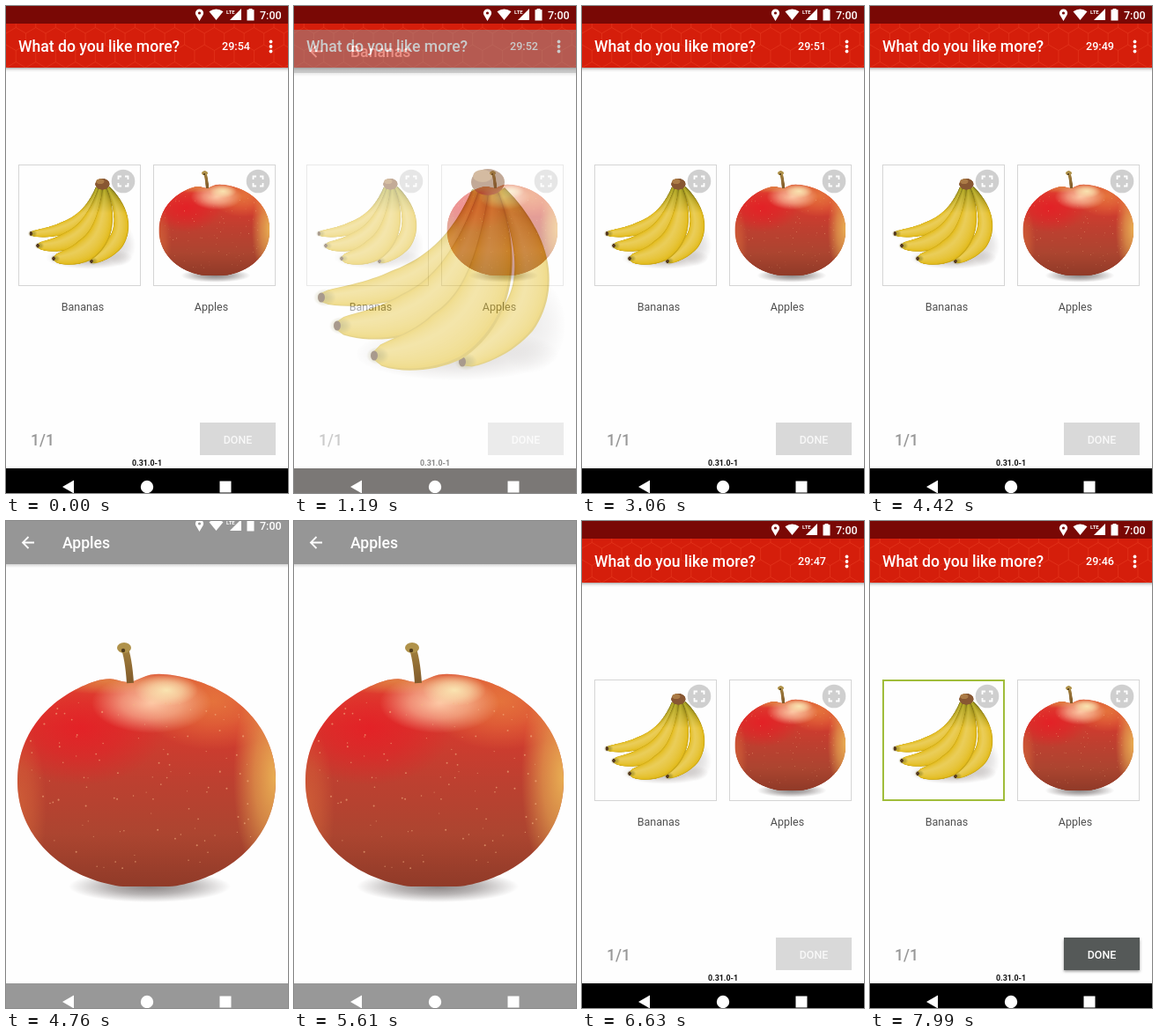
An HTML page with a canvas that plays this animation: 320x553 px, repeating every 8160 ms.

```html
<!DOCTYPE html>
<html lang="en">
<head>
<meta charset="utf-8">
<title>Fruit poll</title>
<style>
html, body { margin: 0; width: 100%; height: 100%; overflow: hidden; background: #fefefe; }
canvas { display: block; width: 320px; height: 553px; }
</style>
</head>
<body>
<canvas id="stage" width="320" height="553"></canvas>
<script>
const W = 320, H = 553, LOOP = 8160, STEP = 170;
const FADE = 170, SELECT_AT = 6800;
const VISITS = [
  { fruit: 'Bananas', open: 1105, close: 2620 },
  { fruit: 'Apples', open: 4505, close: 5850 }
];
const stage = document.getElementById('stage').getContext('2d');
const clamp = v => Math.max(0, Math.min(1, v));

function layer(paint) {
  const c = document.createElement('canvas');
  c.width = W;
  c.height = H;
  paint(c.getContext('2d'));
  return c;
}

function rect(g, x, y, w, h, color) {
  g.fillStyle = color;
  g.fillRect(x, y, w, h);
}

function oval(g, x, y, rx, ry, color) {
  g.fillStyle = color;
  g.beginPath();
  g.ellipse(x, y, rx, ry, 0, 0, Math.PI * 2);
  g.fill();
}

const dot = (g, x, y, r, color) => oval(g, x, y, r, r, color);

function triangle(g, ax, ay, bx, by, cx, cy) {
  g.beginPath();
  g.moveTo(ax, ay);
  g.lineTo(bx, by);
  g.lineTo(cx, cy);
  g.fill();
}

function text(g, s, x, y, size, weight, color, align = 'left') {
  g.font = `${weight} ${size}px Roboto, sans-serif`;
  g.textAlign = align;
  g.fillStyle = color;
  g.fillText(s, x, y);
}

function vertical(g, y0, y1, ...colors) {
  const grad = g.createLinearGradient(0, y0, 0, y1);
  colors.forEach((c, i) => grad.addColorStop(i / (colors.length - 1), c));
  return grad;
}

// Soft elliptical spot; rgb is "r,g,b"
function glow(g, x, y, rx, ry, rgb, a) {
  g.save();
  g.translate(x, y);
  g.scale(rx, ry);
  const grad = g.createRadialGradient(0, 0, 0, 0, 0, 1);
  grad.addColorStop(0, `rgba(${rgb},${a})`);
  grad.addColorStop(0.5, `rgba(${rgb},${a * 0.6})`);
  grad.addColorStop(1, `rgba(${rgb},0)`);
  dot(g, 0, 0, 1, grad);
  g.restore();
}

// Swollen tube along a quadratic spine; nested layers brighten toward the lit side
function banana(g, tipX, tipY, bendX, bendY, neckX, girth) {
  const neckY = 182, LAYERS = 12, N = 40;
  const edge = (u, side, shift) => {
    const v = 1 - u;
    const x = v * v * tipX + 2 * u * v * bendX + u * u * neckX;
    const y = v * v * tipY + 2 * u * v * bendY + u * u * neckY;
    const dx = v * (bendX - tipX) + u * (neckX - bendX);
    const dy = v * (bendY - tipY) + u * (neckY - bendY);
    const half = 5 + (girth - 5) * Math.sqrt(clamp(u * 3)) * (1 - u ** 4);
    const k = half * (side + shift) / Math.hypot(dx, dy);
    return [x + dy * k, y - dx * k];
  };
  for (let i = 0; i < LAYERS; i++) {
    const d = i / LAYERS;
    g.beginPath();
    for (let n = 0; n <= N; n++) g.lineTo(...edge(n / N, 1 - d, d * 0.3));
    for (let n = N; n >= 0; n--) g.lineTo(...edge(n / N, d - 1, d * 0.3));
    const light = 45 + 19 * Math.sqrt(d);
    g.fillStyle = vertical(g, 185, 250, `hsl(56,65%,${light - 20}%)`, `hsl(48,78%,${light}%)`);
    g.fill();
  }
  glow(g, tipX + 4, tipY, 13, 10, '125,115,25', 0.6);
  oval(g, tipX, tipY, 4, 5.5, '#55391f');
}

function paintBananas(g) {
  glow(g, 185, 368, 115, 30, '80,65,60', 0.38);
  glow(g, 268, 335, 40, 55, '80,70,70', 0.2);
  banana(g, 31, 304, 182, 301, 207, 17);
  banana(g, 49, 336, 195, 342, 215, 24);
  banana(g, 191, 377, 322, 316, 235, 22);
  banana(g, 91, 370, 246, 366, 226, 31);
  oval(g, 220, 173, 19, 15, '#885732');
  oval(g, 214, 166, 11, 7, '#ab7b46');
}

function paintApple(g) {
  const cx = 159.5, cy = 295, rx = 146.5, ry = 122, power = 2 / 2.08;
  const round = v => Math.sign(v) * Math.abs(v) ** power;
  glow(g, 163, 415, 92, 18, '60,50,50', 0.6);
  g.save();
  // Rounded body with a dip under the stem and a flat base
  g.beginPath();
  for (let a = 0; a < Math.PI * 2; a += 0.03) {
    const x = cx + rx * round(Math.cos(a));
    const y = cy + ry * round(Math.sin(a));
    const dip = y < cy ? 9 * Math.exp(-(((x - 140) / 18) ** 2)) : 0;
    g.lineTo(x, Math.min(y + dip, 415));
  }
  g.clip();
  rect(g, 0, 0, W, H, vertical(g, 173, 417, '#dc5638', '#d43a2e', '#bd4030', '#ac4530', '#8f3a28'));
  glow(g, 85, 235, 95, 65, '232,26,36', 0.75);
  glow(g, 235, 205, 85, 55, '232,125,62', 0.8);
  glow(g, 306, 290, 48, 130, '235,180,85', 0.95);
  glow(g, 14, 325, 32, 95, '220,110,60', 0.6);
  glow(g, 115, 182, 75, 15, '226,140,70', 0.75);
  glow(g, 165, 207, 68, 34, '255,205,170', 0.95);
  glow(g, 182, 192, 36, 18, '250,232,180', 0.95);
  let seed = 17;
  const rnd = () => (seed = seed * 16807 % 2147483647) / 2147483647;
  for (let i = 0; i < 110; i++) {
    dot(g, 28 + rnd() * 250, 205 + rnd() * 190, 0.5 + rnd() * 0.6, 'rgba(245,180,130,0.6)');
  }
  g.restore();
  g.lineWidth = 8;
  g.strokeStyle = vertical(g, 140, 185, '#a58440', '#80592a');
  g.beginPath();
  g.moveTo(134, 143);
  g.quadraticCurveTo(139, 155, 141, 184);
  g.stroke();
  oval(g, 134, 144, 8, 6, '#b0924a');
  dot(g, 133, 147, 2.2, '#513c1c');
}

const fruits = { Bananas: layer(paintBananas), Apples: layer(paintApple) };

function paintStatus(g) {
  // Location pin with a hole
  g.fillStyle = '#fff';
  g.beginPath();
  g.arc(219.5, 8, 4.6, Math.PI * 0.88, Math.PI * 0.12);
  g.lineTo(219.5, 17);
  g.closePath();
  g.moveTo(221.1, 8);
  g.arc(219.5, 8, 1.6, 0, Math.PI * 2);
  g.fill('evenodd');
  // Wifi fan
  g.beginPath();
  g.moveTo(238.5, 16);
  g.lineTo(230.5, 6.3);
  g.quadraticCurveTo(238.5, 0.8, 246.5, 6.3);
  g.fill();
  triangle(g, 267, 3, 267, 16, 254, 16);
  rect(g, 273.5, 4.2, 8, 12.3, '#fff');
  rect(g, 275.5, 3, 4, 2, '#fff');
  text(g, 'LTE', 250, 8.5, 6, 700, '#fff');
  text(g, '7:00', 288, 14.5, 12.5, 500, '#fff');
}

function paintNav(g, color) {
  rect(g, 0, 525, W, 28, color);
  g.fillStyle = '#fff';
  triangle(g, 64, 546, 77, 538.5, 77, 553.5);
  dot(g, 160, 546, 7.2, '#fff');
  rect(g, 242.5, 539.5, 13, 13, '#fff');
}

function paintHeader(g) {
  g.save();
  g.beginPath();
  g.rect(0, 20, W, 50);
  g.clip();
  rect(g, 0, 20, W, 50, '#d51e0b');
  g.strokeStyle = 'rgba(240,75,45,0.4)';
  g.lineWidth = 1;
  const r = 13, dx = r * Math.sqrt(3);
  for (let row = 0; row < 4; row++) {
    for (let x = row % 2 * dx / 2; x < W + dx; x += dx) {
      g.beginPath();
      for (let k = 0; k < 4; k++) {
        const a = Math.PI * (k / 3 - 0.5);
        g.lineTo(x + r * Math.cos(a), 18 + row * r * 1.5 + r * Math.sin(a));
      }
      g.stroke();
    }
  }
  g.restore();
  rect(g, 0, 70, W, 5, vertical(g, 70, 75, 'rgba(0,0,0,0.3)', 'rgba(0,0,0,0.08)', 'rgba(0,0,0,0)'));
}

function paintCard(g, name, x, labelX, picked) {
  g.save();
  g.translate(x + 1, 128);
  g.scale(0.429, 0.429);
  g.drawImage(fruits[name], 0, 0);
  g.restore();
  const line = picked ? 2 : 1;
  g.lineWidth = line;
  g.strokeStyle = picked ? '#a0bd3a' : '#d5d5d5';
  g.strokeRect(x + line / 2, 180 + line / 2, 139 - line, 138 - line);

  const cx = x + 119, cy = 199;
  dot(g, cx, cy, 13.3, 'rgba(200,200,200,0.88)');
  g.strokeStyle = '#fff';
  g.lineWidth = 1.8;
  for (const sx of [-1, 1]) for (const sy of [-1, 1]) {
    g.beginPath();
    g.moveTo(cx + sx * 2, cy + sy * 5.5);
    g.lineTo(cx + sx * 5.5, cy + sy * 5.5);
    g.lineTo(cx + sx * 5.5, cy + sy * 2);
    g.stroke();
  }
  text(g, name, labelX, 346, 12.5, 400, '#505050', 'center');
}

function paintMain(g, t) {
  rect(g, 0, 0, W, H, '#fefefe');
  rect(g, 0, 0, W, 20, '#790805');
  paintHeader(g);
  text(g, 'What do you like more?', 14, 52, 17.6, 500, '#fff');
  const sec = 54 - Math.floor(t / 1000 + 0.9);
  text(g, '29:' + sec, 245, 50, 12.6, 500, '#fff');
  for (const dy of [-5.5, 0, 5.5]) dot(g, 300.5, 46 + dy, 1.9, '#fff');

  const picked = t >= SELECT_AT;
  paintCard(g, 'Bananas', 14, 87, picked);
  paintCard(g, 'Apples', 167, 233, false);

  text(g, '1/1', 28, 498.5, 17.6, 500, '#989898');
  g.save();
  if (picked) {
    g.shadowColor = 'rgba(0,0,0,0.4)';
    g.shadowBlur = 3;
    g.shadowOffsetY = 1.5;
  }
  rect(g, 220, 473, 86, 37, picked ? '#555958' : '#d9d9d9');
  g.restore();
  text(g, 'DONE', 263, 496.5, 12.4, 500, picked ? '#fff' : '#f8f8f8', 'center');
  text(g, '0.31.0-1', 160, 522, 8.9, 700, '#111', 'center');
}

function paintDetail(g, name) {
  rect(g, 0, 0, W, H, '#fefefe');
  g.drawImage(fruits[name], 0, 0);
  rect(g, 0, 0, W, 49, '#969696');
  rect(g, 0, 49, W, 4, vertical(g, 49, 53, 'rgba(0,0,0,0.16)', 'rgba(0,0,0,0)'));
  text(g, name, 64, 31, 17.6, 500, '#fff');
  g.strokeStyle = '#fff';
  g.lineWidth = 1.8;
  g.beginPath();
  g.moveTo(32, 24.5);
  g.lineTo(19, 24.5);
  g.moveTo(25.5, 18);
  g.lineTo(19, 24.5);
  g.lineTo(25.5, 31);
  g.stroke();
}

const details = {};

function buildDetails() {
  for (const { fruit } of VISITS) details[fruit] = layer(g => paintDetail(g, fruit));
}

// Draws the open picture page and returns how far the status icons have moved
function drawVisit(g, t, { fruit, open, close }) {
  const enter = clamp((t - open) / FADE);
  const leave = clamp((t - close) / FADE);
  const full = enter === 1 && leave === 0;
  const y = full ? 0 : enter < 1 ? 20 + 14 * (1 - enter) : 22 * leave;
  rect(g, 0, 20, W, H, `rgba(0,0,0,${0.1 * leave})`);
  g.globalAlpha = enter * (1 - leave);
  g.drawImage(details[fruit], 0, y);
  g.globalAlpha = 1;
  paintNav(g, full ? '#989898' : '#7b7876');
  if (full) return -20 * clamp((t - open - FADE) / FADE) ** 2;
  return enter < 1 ? 0 : -4 * (1 - leave);
}

function draw(t) {
  const g = stage;
  const visit = VISITS.find(v => t >= v.open && t < v.close + FADE);
  paintMain(g, t);
  paintNav(g, '#000');
  const statusY = visit ? drawVisit(g, t, visit) : 0;
  g.save();
  g.translate(0, statusY);
  paintStatus(g);
  g.restore();
}

let shown = -1;
const start = performance.now();

function frame() {
  const step = Math.floor((performance.now() - start) % LOOP / STEP);
  if (step !== shown) {
    shown = step;
    draw(step * STEP);
  }
  requestAnimationFrame(frame);
}

buildDetails();
frame();
</script>
</body>
</html>
```
